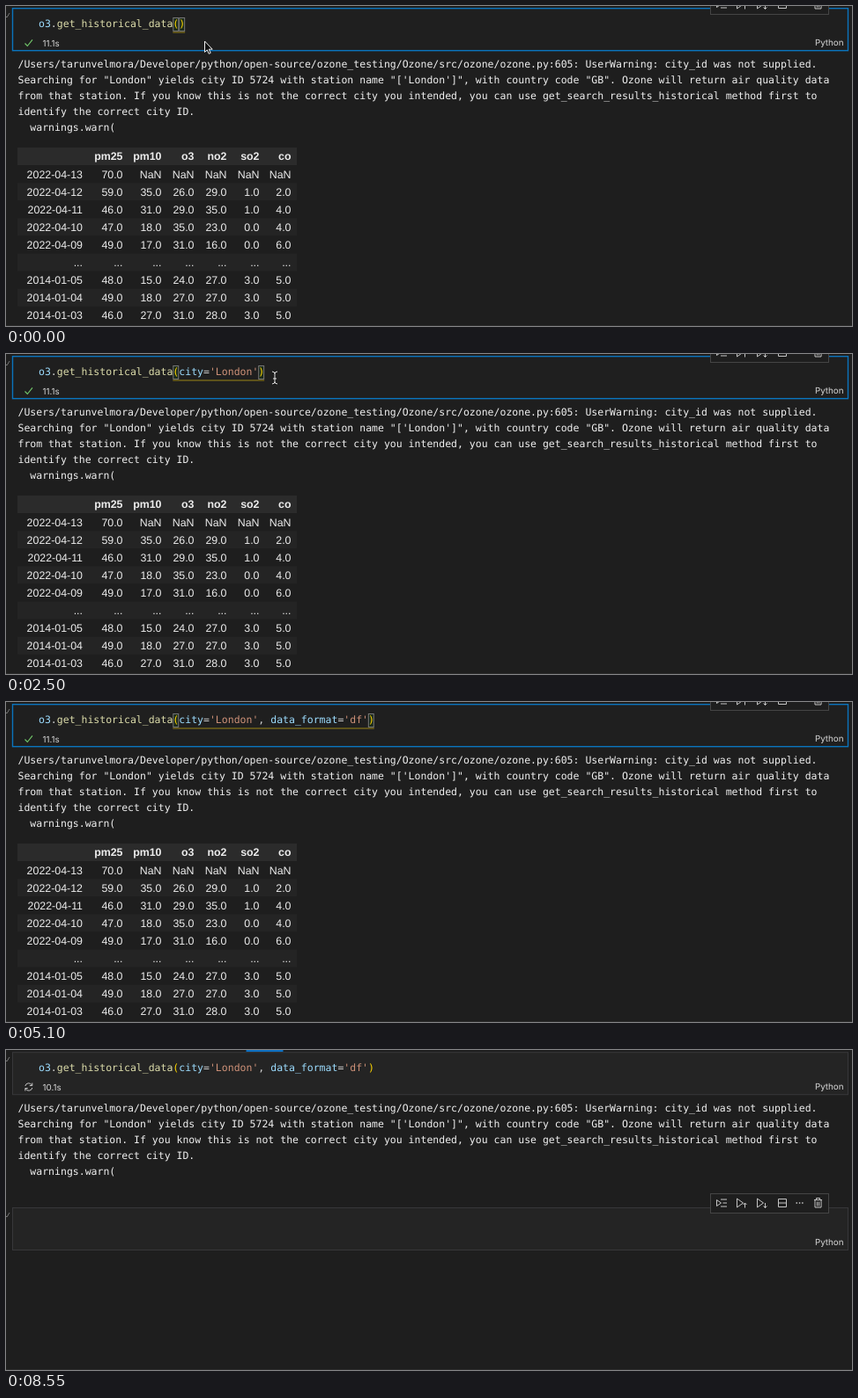
An HTML page for the animation above (8600 ms loop, 960x364 px).

```html
<!DOCTYPE html>
<html lang="en">
<head>
<meta charset="utf-8">
<title>Notebook cell</title>
<style>
  html, body { margin: 0; width: 100%; height: 100%; overflow: hidden; background: #1e1e1e; }
  svg { display: block; width: 960px; height: 364px; }
  text { white-space: pre; text-rendering: geometricPrecision; }
  .mono { font: 11.5px "DejaVu Sans Mono", monospace; }
  .ui { font: 11.3px Inter, sans-serif; fill: #e0e0e0; }
  .small { font-size: 9.8px; fill: #d8d8d8; }
  .data { font: 12.4px "Liberation Sans", sans-serif; fill: #ececec; text-anchor: end; }
  .bold { font-weight: 700; }
  .end { text-anchor: end; }
  .icon { fill: none; stroke: #c5c5c5; stroke-width: 1; }
</style>
</head>
<body>
<svg viewBox="0 0 960 364">
  <defs>
    <g id="toolbar">
      <rect x="799.5" y="163.5" width="134" height="22" fill="#1e1e1e" stroke="#454545"/>
      <g class="icon">
        <path d="M806.5 170.5l5 3.5-5 3.5zM811 170h7M813.5 174h4.5M811 178h7"/>
        <path d="M829.5 169v10l7-5zM838.5 179.5v-5.5m-2 2l2-2 2 2"/>
        <path d="M852.5 169v10l7-5zM861.5 174v5.5m-2-2l2 2 2-2"/>
        <path d="M876.5 169.5h9v9h-9zM876.5 174h9"/>
        <path d="M917 170.5h9M919.5 170.5v-2h4v2M918 170.5v8.5h7v-8.5M920.5 172.5v5M922.5 172.5v5"/>
      </g>
      <path d="M896.5 174h1.5m1.8 0h1.5m1.8 0h1.5" stroke="#c5c5c5" stroke-width="1.5"/>
    </g>
    <path id="wrench" class="icon" d="M0 8l5-5a3 3 0 0 1 4-3l-2 2 1.5 1.5 2-2a3 3 0 0 1-4 4l-5 5z"/>
    <path id="tick" d="M0 12l1 1 3-5" fill="none" stroke="#777"/>
  </defs>
  <g id="stage"></g>
</svg>
<script>
const LOOP = 8600, STEP = 50, CHAR = 6.923, CODE_X = 37;
const RUN = 5150, BAR_START = 5489, BAR_PERIOD = 4000 / 3;

// Typed arguments; | marks the caret.
const typing = [
  [0, ""], [50, "|"], [1000, "c|"], [1100, "ci|"], [1200, "cit|"], [1300, "city|"],
  [1400, "city=|"], [1550, "city='|'"], [1700, "city='L|'"], [1800, "city='Lo|'"],
  [1900, "city='Lon|'"], [2000, "city='Lond|'"], [2150, "city='Londo|'"],
  [2250, "city='London|'"], [2400, "city='London'"], [2600, "city='London',|"],
  [2750, "city='London', |"], [2850, "city='London', d|"], [3000, "city='London', da|"],
  [3150, "city='London', dat|"], [3300, "city='London', data|"],
  [3500, "city='London', data_format=|"], [4400, "city='London', data_format='|'"],
  [4550, "city='London', data_format='d|'"], [4700, "city='London', data_format='df|'"],
  [4850, "city='London', data_format='df'|"], [5100, "city='London', data_format='df'"]
];

const popups = [
  { from: 1000, to: 1400, x: 179, items: "city= city_id= class continue callable chr classmethod compile complex copyright credits ChildProcessError".split(" ") },
  { from: 2850, to: 3500, x: 283, items: "data_format= def del delattr dict".split(" ") },
  { from: 3600, to: 4400, x: 383, dots: true, items: ["data_format=", "'json')", "'raw',", "'raw')", "'raw", "'json"] }
];

const warning = [
  "/Users/tarunvelmora/Developer/python/open-source/ozone_testing/Ozone/src/ozone/ozone.py:605: UserWarning: city_id was not supplied.",
  "Searching for \"London\" yields city ID 5724 with station name \"['London']\", with country code \"GB\". Ozone will return air quality data",
  "from that station. If you know this is not the correct city you intended, you can use get_search_results_historical method first to",
  "identify the correct city ID.",
  "  warnings.warn("
];

const table = `- pm25 pm10 o3 no2 so2 co
2022-04-13 70.0 NaN NaN NaN NaN NaN
2022-04-12 59.0 35.0 26.0 29.0 1.0 2.0
2022-04-11 46.0 31.0 29.0 35.0 1.0 4.0
2022-04-10 47.0 18.0 35.0 23.0 0.0 4.0
2022-04-09 49.0 17.0 31.0 16.0 0.0 6.0
... ... ... ... ... ... ...
2014-01-05 48.0 15.0 24.0 27.0 3.0 5.0
2014-01-04 49.0 18.0 27.0 27.0 3.0 5.0
2014-01-03 46.0 27.0 31.0 28.0 3.0 5.0`.split("\n").map(row => row.split(" "));
const columns = [87, 132.5, 176.5, 213.5, 250.5, 287.5, 323.5];

const rect = (x, y, w, h, fill, stroke = "none", line = 1) =>
  `<rect x="${x}" y="${y}" width="${w}" height="${h}" fill="${fill}" stroke="${stroke}" stroke-width="${line}"/>`;
const text = (x, y, value, cls, fill) =>
  `<text x="${x}" y="${y}" class="${cls}"${fill ? ` style="fill:${fill}"` : ""}>${value}</text>`;
const span = (value, fill) => `<tspan fill="${fill}">${value}</tspan>`;
const colX = col => CODE_X + col * CHAR;

function cell(y, focused) {
  const frame = focused ? ["#1f1f1f", "#0a74bd", 1.4] : ["#242424", "#37373a"];
  return rect(7.5, y, 948, 48, ...frame) + text(950.5, y + 42.5, "Python", "ui small end");
}

const output = warning.map((line, i) => text(13.5, 70.3 + 18 * i, line, "mono", "#f0f0f0")).join("");

const dataframe = table.map((row, r) => {
  const top = 161 + 20.1 * r;
  const shade = r === 0 ? "#2b2b2b" : r % 2 ? "#1e1e1e" : "#242424";
  return rect(13, top, 317, 20.1, shade) + row.map((value, c) =>
    value === "-" ? "" : text(columns[c], top + 14.4, value, r ? "data" : "data bold")).join("");
}).join("");

function code(args, focused) {
  const plain = args.replace("|", "");
  const last = 23 + plain.length;
  const tokens = (plain.match(/'[^']*'?|\w+|./g) || []).map(token =>
    span(token, token[0] === "'" ? "#ce9178" : /\w/.test(token) ? "#9cdcfe" : "#d4d4d4")).join("");
  let out = "";
  if (focused) {
    out += [22, last].map(c => rect(colX(c) + .5, 13.5, CHAR - 1, 15, "#1c2b1c", "#777")).join("")
      + rect(colX(22), 29.5, (last - 21) * CHAR, 1, "#9c8518");
  }
  out += text(CODE_X, 24, span("o3", "#9cdcfe") + span(".", "#d4d4d4")
    + span("get_historical_data", "#dcdcaa") + span("(", "#ffd700") + tokens + span(")", "#ffd700"), "mono");
  const caret = args.indexOf("|");
  if (caret >= 0) out += rect(colX(23 + caret) - .5, 13, 1.3, 16, "#c8c8c8");
  return out;
}

function squiggle(col) {
  return `<path d="M${colX(col)} 31l1.5-2 2 2 2-2 1.5 2" fill="none" stroke="#e04a3f"/>`;
}

function hint(x) {
  return rect(x + .5, -4.5, 363, 17, "#252526", "#454545")
    + text(x + 31, 2, "If not given, city argument must not be None.", "ui", "#ddd")
    + rect(x + 1, 6, 229, 6, "#4a4a4a");
}

function popup({ x, items, dots }) {
  const pitch = 17.3;
  return rect(x + .5, 29.5, 354, items.length * pitch + 2, "#252526", "#454545")
    + rect(x + 1, 30, 353, pitch, "#094771")
    + items.map((item, i) => {
      const mid = 38.7 + i * pitch;
      const variable = `<path class="icon" style="stroke:#75beff" d="M${x + 6} ${mid - 4}h-2v8h2m6-8h2v8h-2M${x + 6} ${mid + 2}v-3l3-1.5 3 1.5v3l-3 1zM${x + 6} ${mid - 1}l3 1 3-1"/>`;
      const tool = `<use href="#wrench" x="${x + 4}" y="${mid - 4}"/>`
        + `<circle cx="${x + 23}" cy="${mid}" r="2.7" fill="#c5c5c5"/>`;
      return (i && dots ? tool : variable)
        + text(x + (i && dots ? 35 : 19), mid + 4, item, "mono" + (i ? "" : " bold"), i ? "#eee" : "#2aaaff");
    }).join("");
}

function status(t) {
  if (t < RUN) {
    return `<path d="M21.5 42.5l2.8 3 5.7-7.2" fill="none" stroke="#73c96b" stroke-width="1.1"/>`
      + text(41.5, 45.5, "11.1s", "ui small");
  }
  const angle = (t - 5550) / 500 * 360;
  return `<g class="icon" transform="translate(25.8 42) rotate(${angle})">
    <path d="M-4-1a4 4 0 0 1 7.5-1M4 1a4 4 0 0 1-7.5 1M4-4.5v3h-3M-4 4.5v-3h3"/></g>`
    + text(41.5, 45.5, Math.floor((t - RUN) * 3 / 1000) + ".1s", "ui small");
}

function progress(t) {
  if (t < BAR_START) return "";
  const p = (t - BAR_START) / BAR_PERIOD % 1, unit = 960 / 50;
  const shift = p < .5 ? 50 * p : 25 + 48 * (p - .5);
  const width = unit * (p < .5 ? 1 + 4 * p : 5 - 4 * p);
  return rect(unit * (shift + .5) - width / 2, 0, width, 2, "#0e70c0");
}

function pointer(t) {
  if (t < 200) {
    return `<path d="M225.5 40v12.5l2.8-2.6 1.9 4.4 2-.9-1.9-4.2h3.9z" fill="#111" stroke="#eee"/>`;
  }
  if (t >= 2350 && t < 2650) {
    const beam = "M302 20q3 0 3 2.5v9q0 2.5-3 2.5M308 20q-3 0-3 2.5M308 34q-3 0-3-2.5M303 28h4";
    return `<path d="${beam}" fill="none" stroke="#111" stroke-width="2.5"/><path d="${beam}" fill="none" stroke="#eee"/>`;
  }
  return "";
}

function scene(t) {
  const focused = t < RUN;
  const args = typing.filter(([at]) => at <= t).pop()[1];
  let out = cell(2.7, focused) + code(args, focused) + status(t) + output
    + `<use href="#tick"/>` + rect(0, 363, 960, 1, "#2b2b2b");
  if (focused) {
    out += dataframe + `<use href="#toolbar" y="-176"/>`;
    if (t >= 3600 && t < 4400) out += squiggle(22) + squiggle(50);
    if (t >= 2600 && t < 4850) out += hint(t < 3500 ? 300 : 383);
    out += popups.filter(p => t >= p.from && t < p.to).map(popup).join("");
  } else {
    out += cell(179.5, false) + `<use href="#tick" y="177"/><use href="#toolbar"/>` + progress(t);
  }
  return out + pointer(t);
}

const stage = document.getElementById("stage");
let shown = -1;
function frame() {
  const t = Math.floor(performance.now() % LOOP / STEP) * STEP;
  if (t !== shown) stage.innerHTML = scene(shown = t);
  requestAnimationFrame(frame);
}
frame();
</script>
</body>
</html>
```
